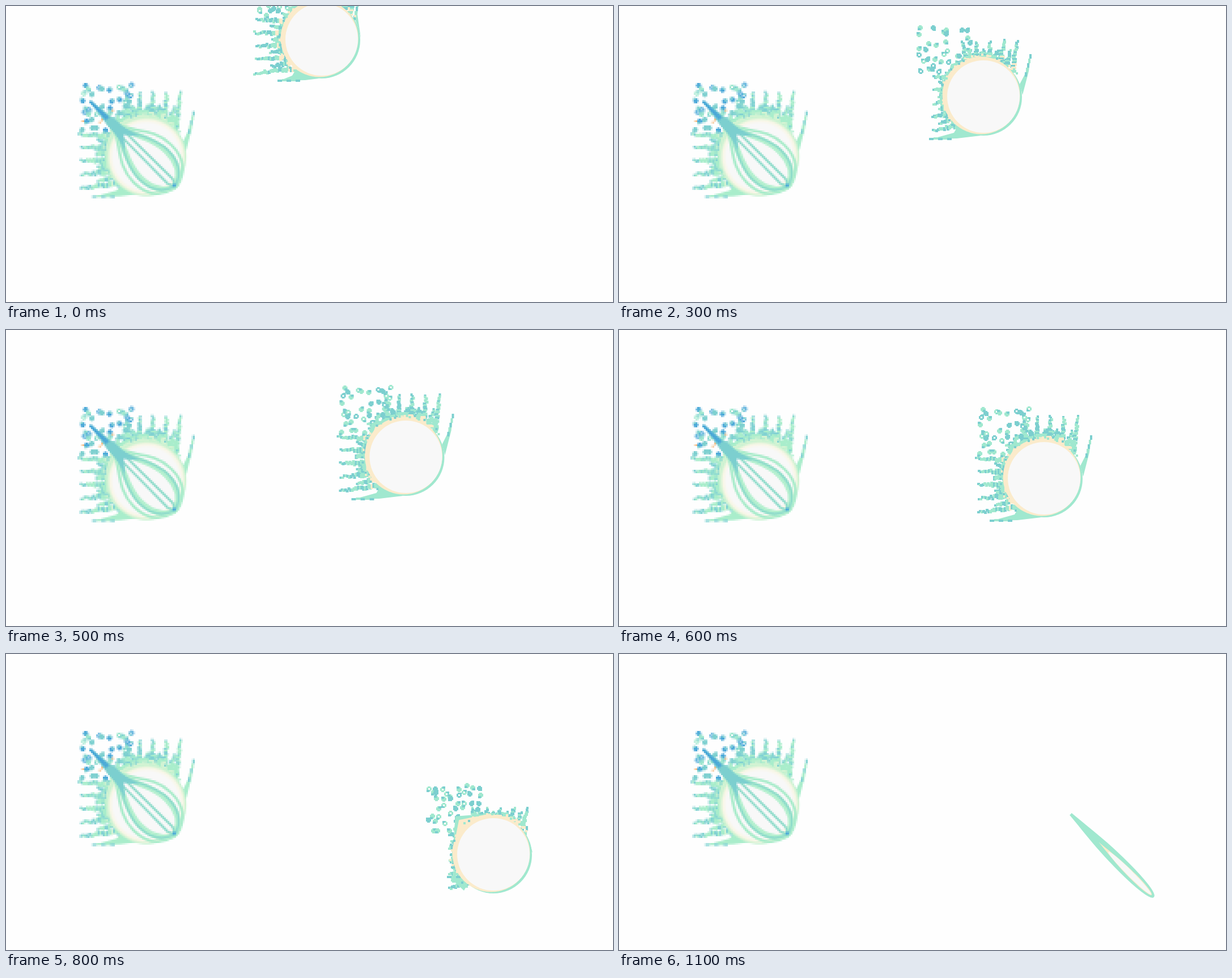
These frames come from a looping animation (1071x523 px, 1200 ms). An HTML page with a canvas:

```html
<!DOCTYPE html>
<html lang="en">
<head>
<meta charset="utf-8">
<style>
  html, body { margin: 0; width: 100%; height: 100%; overflow: hidden; background: #fefefe; }
  canvas { display: block; }
</style>
</head>
<body>
<canvas id="stage" width="1071" height="523"></canvas>
<script>
const stage = document.getElementById('stage').getContext('2d');
const PAPER = '#fefefe', CREAM = '#fbebcb', MINT = '#a0e8cf', TEAL = '#7ccfcf', BLUE = '#4aa8d8', WHITE = '#f8f8f8';
const BRIGHT = { body: MINT, edge: TEAL, core: CREAM, drops: [MINT, MINT, TEAL] };
const DEEP = { body: '#a9edcb', edge: '#82d2d2', core: '#d3f3d3', drops: [BLUE, TEAL, BLUE, MINT] };

// up, left: how far the spikes reach from the centre; horn, tail: tips of the two side flames.
const FLAMES = {
  cut: { up: 90, left: 120, fringe: 12, bulge: 72, horn: [66, -70], tail: [-74, 73] },
  wisp: { up: 82, left: 78, fringe: 3, bulge: 86, horn: [59, -46], tail: [-78, 40] },
  scatter: { up: 100, left: 90, fringe: 7, bulge: 72, horn: [83, -71], tail: [-92, 75] },
  full: { up: 114, left: 121, fringe: 18, bulge: 76, horn: [83, -72], tail: [-92, 75] }
};

let seed;
function random() {
  seed = (seed * 16807) % 2147483647;
  return seed / 2147483647;
}
const pick = list => list[Math.floor(random() * list.length)];

function block(g, x, y, w, h, color) {
  g.fillStyle = color;
  g.fillRect(Math.round(x - w / 2), Math.round(y - h / 2), w, h);
}

function disc(g, x, y, r, color) {
  g.fillStyle = color;
  g.beginPath();
  g.arc(x, y, r, 0, 7);
  g.fill();
}

function polygon(g, color, ...points) {
  g.fillStyle = color;
  g.beginPath();
  points.forEach(([x, y]) => g.lineTo(x, y));
  g.fill();
}

// A ragged streak from its tip to the rim, upright above the ball and level beside it.
function streak(g, x, y, colors) {
  const upright = -y > Math.abs(x);
  const side = (upright ? x : y) * 0.85;
  const depth = -Math.sqrt(Math.max(0, 68 ** 2 - side ** 2));
  const [footX, footY] = upright ? [side, depth] : [depth, side];
  const steps = Math.max(2, Math.ceil(Math.hypot(footX - x, footY - y) / 3));
  for (let i = 0; i <= steps; i++) {
    const k = i / steps;
    const size = 4 + Math.round(k * 6);
    const jitter = (random() - 0.5) * 4;
    const px = x + (footX - x) * k + (upright ? jitter : 0);
    const py = y + (footY - y) * k + (upright ? 0 : jitter);
    let color = random() < 0.6 - k * 0.4 ? colors.edge : colors.body;
    if (k > 0.75 && random() < 0.4) color = colors.core;
    block(g, px, py, upright ? size : 5, upright ? 5 : size, color);
  }
}

function droplet(g, x, y, colors) {
  const color = pick(colors.drops);
  block(g, x, y, 9, 5, color);
  block(g, x, y, 5, 9, color);
  block(g, x + pick([-2, 2]), y + pick([-3, 3]), 5, 4, colors.edge);
  if (random() < 0.35) block(g, x, y, 3, 3, PAPER);
}

// Droplets fill the upper left corner in a loose grid.
function spray(g, colors) {
  for (let x = -110; x < -18; x += 12) {
    for (let y = -118; y < -42; y += 12) {
      const px = x + random() * 10 - 5, py = y + random() * 10 - 5;
      const distance = Math.hypot(px, py);
      if (distance > 80 && distance < 168 && random() < 0.72) droplet(g, px, py, colors);
    }
  }
}

function corner(g, distance, color) {
  const c = distance * Math.SQRT1_2;
  polygon(g, color, [-c, -c], [-4, -72], [-72, -4]);
}

function flame(g, { up, left, fringe, bulge, horn, tail }, colors) {
  seed = 77;
  for (let a = 145; a < 312; a += 4) {
    const angle = a * Math.PI / 180;
    const reach = 71 + random() * fringe;
    streak(g, Math.cos(angle) * reach, Math.sin(angle) * reach, colors);
  }
  for (let i = 0; i < 9; i++) {
    const tall = (i % 2 ? 0.3 : 0.85) + random() * 0.15;
    streak(g, -36 + i * 12, -70 - (up - 70) * tall, colors);
    streak(g, -70 - (left - 70) * tall, -36 + i * 12, colors);
  }
  spray(g, colors);
  corner(g, bulge + 9, colors.body);

  polygon(g, colors.body, horn, [horn[0] - 3, horn[1] + 26], [69, -3], [64, -22], [horn[0] - 9, horn[1] + 30]);
  polygon(g, colors.body, tail, [tail[0] + 45, tail[1] - 1], [-5, 69], [-45, 52], [-52, 64]);
  for (let i = 0; i < 5; i++) {
    const color = i % 2 ? colors.body : colors.edge;
    block(g, horn[0] - i * 2, horn[1] + i * 8, 4, 8, color);
    block(g, tail[0] + i * 8, tail[1] - i % 2, 8, 4, color);
  }
  disc(g, 0, 1, 68, colors.body);
  disc(g, -4, -2, 68.5, colors.core);
  corner(g, bulge, colors.core);
  for (let a = 130; a < 330; a += 7) {
    const angle = a * Math.PI / 180;
    const reach = 71 + random() * 4;
    block(g, Math.cos(angle) * reach - 2, Math.sin(angle) * reach, 4, 4, pick([colors.core, colors.body, colors.edge]));
  }
}

function fireball(x, y, name) {
  stage.save();
  stage.translate(x, y);
  flame(stage, FLAMES[name], BRIGHT);
  disc(stage, 0, 0, 64, WHITE);
  stage.restore();
}

// Half outline of a drop along the x axis, mirrored to close it.
function dropPath(start, end, width) {
  const at = k => start + (end - start) * k;
  const path = new Path2D();
  for (const w of [width, -width]) {
    path.moveTo(start, 0);
    path.bezierCurveTo(at(0.26), w * 0.54, at(0.38), w, at(0.66), w);
    path.bezierCurveTo(at(0.85), w, end, w * 0.55, end, 0);
  }
  return path;
}

// The closing drop grows longer and thinner with each step.
function waterDrop(step) {
  const length = 154 + 25.5 * step, width = 51 - 21 * step, coreStart = 26 + 22 * step;
  stage.save();
  stage.translate(833 - 18 * step, 324 - 20.5 * step);
  stage.rotate(Math.PI / 4);
  const outline = dropPath(0, length, width);
  stage.fillStyle = MINT;
  stage.fill(outline);
  stage.strokeStyle = step < 2 ? TEAL : MINT;
  stage.lineWidth = 3 + step;
  stage.stroke(outline);
  stage.fillStyle = CREAM;
  stage.fill(dropPath(coreStart, length - 3, width - 3));
  stage.fillStyle = WHITE;
  const middle = (coreStart + 19 + length) / 2;
  stage.beginPath();
  stage.ellipse(middle, 0, length - 5 - middle, width - 4, 0, 0, 7);
  stage.fill();
  stage.restore();
}

function mirrored(g, color, lineWidth, path) {
  g.strokeStyle = color;
  g.lineWidth = lineWidth;
  for (const side of [1, -1]) {
    g.save();
    g.scale(1, side);
    g.stroke(new Path2D(path));
    g.restore();
  }
}

// The onion is painted small and enlarged for its coarse pixels.
function makeOnion() {
  const canvas = document.createElement('canvas');
  canvas.width = canvas.height = 75;
  const g = canvas.getContext('2d');
  g.scale(1 / 3, 1 / 3);
  g.translate(128, 132);
  flame(g, FLAMES.full, DEEP);
  const glow = g.createRadialGradient(0, 4, 58, 0, 4, 72);
  glow.addColorStop(0, WHITE);
  glow.addColorStop(0.45, '#f8f6e6');
  glow.addColorStop(0.75, '#d3f3d3');
  glow.addColorStop(1, '#b4f0cf00');
  disc(g, 0, 4, 72, glow);
  for (let i = 0; i < 5; i++) block(g, -118 + random() * 60, -100 + random() * 45, 3, 3, '#f0a050');

  g.translate(-53, -47);
  g.rotate(Math.PI / 4);
  g.lineCap = 'round';
  mirrored(g, '#a9eccb', 5, 'M0 5C30 20 50 47 90 47C125 47 142 28 148 4');
  mirrored(g, '#b4f0cf', 10, 'M0 4C35 12 55 33 92 33C120 33 138 22 146 2');
  mirrored(g, '#8fdccb', 4, 'M0 4C35 13 55 36 92 36C122 36 138 24 146 2');
  mirrored(g, '#8fdccb', 4, 'M8 5L134 6L146 1');
  g.fillStyle = TEAL;
  g.fill(new Path2D('M-66 -2C-40 -4 -25 -7 -8 -9C8 -9 22 -12 40 -18L18 0L40 18C22 12 8 9 -8 9C-25 7 -40 4 -66 2Z'));
  mirrored(g, BLUE, 4, 'M-64 0L-24 2');
  disc(g, 144, 0, 3, BLUE);
  return canvas;
}

const onion = makeOnion();
const looks = ['cut', 'wisp', 'wisp', 'scatter', 'scatter', 'full', 'full', 'scatter', 'wisp'];
const route = [
  { step: 0, x: 557, y: 59 }, { step: 2, x: 625, y: 134 }, { step: 4, x: 661, y: 186 },
  { step: 6, x: 750, y: 262 }, { step: 7, x: 817, y: 313 }, { step: 8, x: 860, y: 354 }
];

function positionAt(step) {
  const next = Math.max(1, route.findIndex(point => point.step >= step));
  const from = route[next - 1], to = route[next];
  const k = (step - from.step) / (to.step - from.step);
  return [from.x + (to.x - from.x) * k, from.y + (to.y - from.y) * k];
}

function render(now) {
  const step = Math.floor(now % 1200 / 100);
  stage.fillStyle = PAPER;
  stage.fillRect(0, 0, 1071, 523);
  stage.imageSmoothingEnabled = false;
  stage.drawImage(onion, 120, 130, 225, 225);
  if (step < looks.length) fireball(...positionAt(step), looks[step]);
  else waterDrop(step - looks.length);
  requestAnimationFrame(render);
}
render(performance.now());
</script>
</body>
</html>
```
